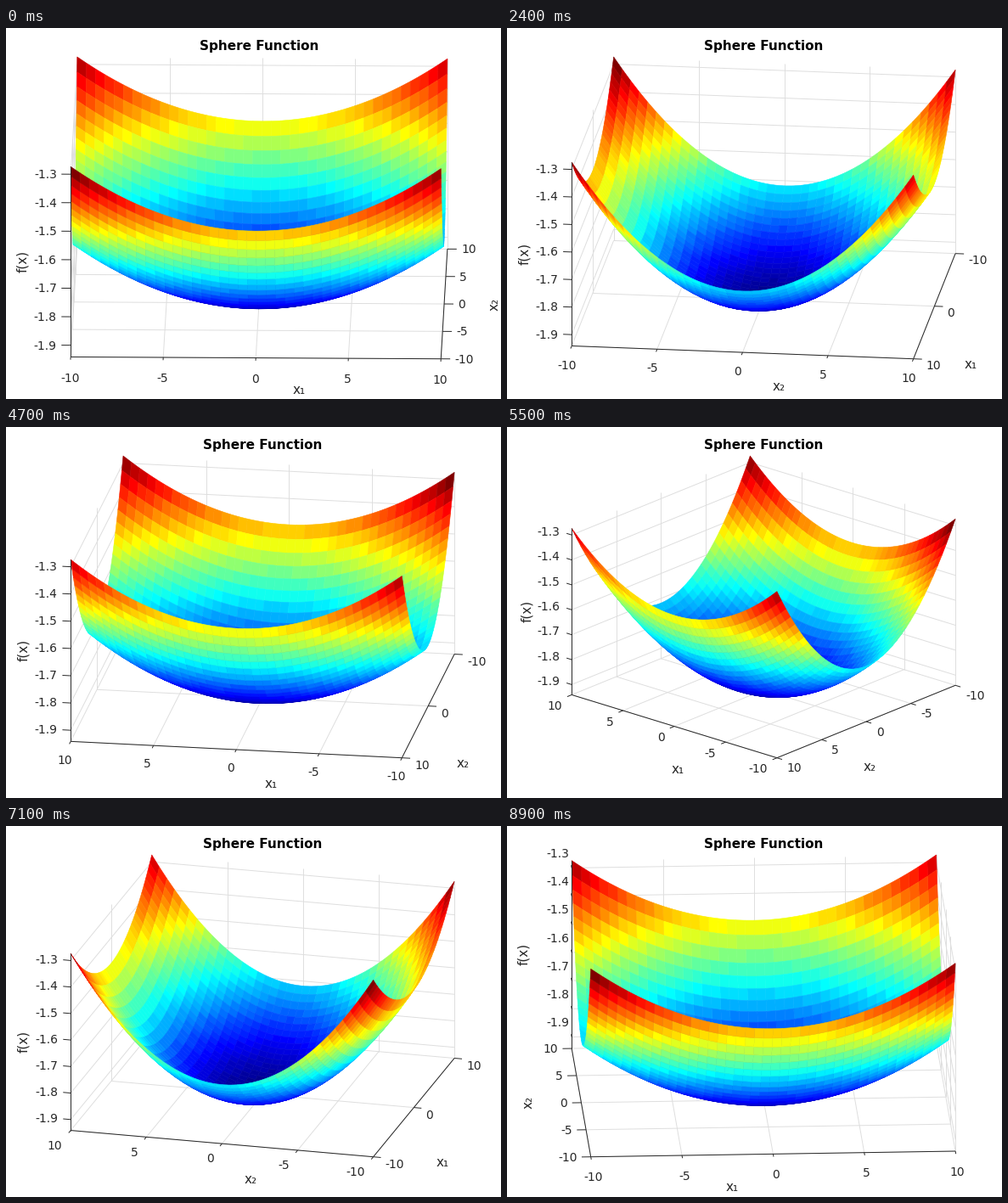
These frames come from a looping animation (583 px wide and 437 px high, 9 s). A matplotlib script:

```python
import numpy as np
import matplotlib.pyplot as plt
from matplotlib.animation import FuncAnimation
from matplotlib.collections import LineCollection, PolyCollection

W, H, DPI = 583, 437, 100
FRAMES = 90
LEFT, RIGHT, TOP, BOTTOM = 76.2, 528.1, 34.0, 389.7
INK, GRID = "#262626", "#dedede"
SIN_EL, COS_EL = 0.5, np.sqrt(3) / 2
TICK = 0.025

plt.rcParams["font.family"] = "DejaVu Sans"
fig = plt.figure(figsize=(W / DPI, H / DPI), dpi=DPI, facecolor="white")
ax = fig.add_axes([0, 0, 1, 1])


def sphere(x, y):
    return (2 * x**2 + 4 * y**2 - 1745) / 899


def jet(v):
    i = np.clip(np.floor(v * 64), 0, 63) + 1
    ramps = [((i - 24), (72 - i)), ((i - 8), (56 - i)), ((i + 8), (40 - i))]
    return np.stack([np.clip(np.minimum(a, b) / 16, 0, 1) for a, b in ramps], -1)


grid = np.linspace(-10, 10, 41)
GX, GY = np.meshgrid(grid, grid, indexing="ij")
GZ = sphere(GX, GY)
Z0, Z1 = GZ.min(), GZ.max()
COLORS = jet((GZ[:-1, :-1] - Z0) / (Z1 - Z0))
Z_TICKS = -np.arange(19, 12, -1) / 10


class View:
    """Orthographic view, stretched to fill the plot box."""

    def __init__(self, az):
        self.c, self.s = np.cos(np.radians(az)), np.sin(np.radians(az))
        self.delta = (az + 45) % 90 - 45
        self.turned = abs(self.delta) < 4
        self.side = 1 if self.delta > 0 else -1
        span = abs(self.c) + abs(self.s)
        self.right = RIGHT
        if self.turned and self.side > 0:
            short = min(abs(self.c), abs(self.s))
            self.right = min(RIGHT, 516 + 0.5 * (RIGHT - LEFT) * short / span)
        self.mid = (LEFT + self.right) / 2
        self.sx = (self.right - LEFT) / span
        self.sy = (BOTTOM - TOP) / (COS_EL + SIN_EL * span)
        self.front = (np.copysign(10, self.s), -np.copysign(10, self.c))

    def __call__(self, x, y, z=Z0):
        x, y = np.asarray(x) / 20, np.asarray(y) / 20
        z = (np.asarray(z) - Z0) / (Z1 - Z0) - 0.5
        px = self.mid + self.sx * (self.c * x + self.s * y)
        up = SIN_EL * (self.c * y - self.s * x) + COS_EL * z
        return np.stack(np.broadcast_arrays(px, (TOP + BOTTOM) / 2 - self.sy * up), -1)


def surface(view):
    pts = view(GX, GY, GZ)
    quads = np.stack([pts[:-1, :-1], pts[1:, :-1], pts[1:, 1:], pts[:-1, 1:]], 2)
    # far cells first
    step = tuple(slice(None, None, int(np.sign(f))) for f in view.front)
    ax.add_collection(PolyCollection(
        quads[step].reshape(-1, 4, 2), facecolors=COLORS[step].reshape(-1, 3),
        edgecolors="face", linewidths=0.4, zorder=2))


def lines(segs, color, z):
    ax.add_collection(LineCollection(segs, colors=color, linewidths=0.7, zorder=z))


def text(x, y, s, size=10, **kw):
    ax.text(x, y, s, **{"fontsize": size, "color": INK, "zorder": 4, **kw})


def unit(v):
    return v / np.hypot(*v)


def on_axis(view, axis, t):
    """Point at value t on the front floor edge that runs along the axis."""
    fx, fy = view.front
    return view(t, fy) if axis == 0 else view(fx, t)


def floor_axis(view, axis, main, ticks, segs):
    """One floor axis with ticks, numbers and name."""
    fx, fy = view.front
    ends = on_axis(view, axis, -10), on_axis(view, axis, 10)
    corner = view(fx, fy)
    out = corner - on_axis(view, 1 - axis, -view.front[1 - axis])
    d = unit(out)
    sgn = 1 if d[0] > 0 else -1
    segs.append(ends)
    for t in ticks:
        p = on_axis(view, axis, t)
        q = p + TICK * out
        segs.append((p, q))
        if main and abs(view.delta) < 12:
            dx, dy, ha = 12 * d[0], 7 + 14 * d[1]**2, "center"
        else:
            ha = "left" if sgn > 0 else "right"
            dx, dy = sgn * (5 + 3 * abs(d[1])), 7 + 9.5 * abs(d[1])
            if not main and view.turned:
                dx, dy = sgn * 5.5, 0
        text(q[0] + dx, q[1] + dy + 5, f"{t:g}", ha=ha)

    name = ("x₁", "x₂")[axis]
    mx, my = (ends[0] + ends[1]) / 2
    a = abs(view.delta)
    if not main and view.turned:
        text(mx + (59 if view.side > 0 else -62), my, name, 11,
             rotation=90, ha="center", va="center")
        return
    shift = view.side * 52 * (1 - a / 45)**1.1
    drop = 38.3 + 0.32 * a if main else 72 - 0.44 * a
    text(mx + shift, my + drop + 4, name, 11, ha="center")


def height_axis(view, segs):
    fx, fy = view.front
    left = min([(-fx, fy), (fx, -fy)], key=lambda p: view(*p)[0])
    out = view(*left) - view(fx, fy)
    d = unit(out)
    ends = view(*left, Z0), view(*left, Z1)
    segs.append(ends)
    for z in Z_TICKS:
        p = view(*left, z)
        q = p + TICK * out
        segs.append((p, q))
        a = q + d * (5.5 + 9 * abs(d[1]))
        text(a[0], a[1] + 5, f"{z:.1f}", ha="right")
    text(19.5 + 0.1 * abs(view.delta), (ends[0][1] + ends[1][1]) / 2, "f(x)", 11,
         rotation=90, ha="center", va="center")


def back_grid(view, xt, yt):
    bx, by = -view.front[0], -view.front[1]
    segs = []
    for t in xt:
        segs += [(view(t, -10), view(t, 10)), (view(t, by), view(t, by, Z1))]
    for t in yt:
        segs += [(view(-10, t), view(10, t)), (view(bx, t), view(bx, t, Z1))]
    for z in Z_TICKS:
        segs += [(view(bx, -10, z), view(bx, 10, z)),
                 (view(-10, by, z), view(10, by, z))]
    lines(segs, GRID, 1)


def draw(k):
    ax.clear()
    ax.set_xlim(0, W)
    ax.set_ylim(H, 0)
    ax.axis("off")
    view = View(1 + 4 * k)
    main = 0 if abs(view.c) > abs(view.s) else 1

    ticks = [None, None]
    for axis in (0, 1):
        size = np.hypot(*(on_axis(view, axis, 10) - on_axis(view, axis, -10)))
        sparse = axis != main and not view.turned and size < 172
        ticks[axis] = range(-10, 11, 10 if sparse else 5)

    back_grid(view, *ticks)
    surface(view)
    segs = []
    for axis in (0, 1):
        floor_axis(view, axis, axis == main, ticks[axis], segs)
    height_axis(view, segs)
    lines(segs, INK, 3)
    text(view.mid, 26, "Sphere Function", 11, ha="center", weight="bold", color="black")
    return []


anim = FuncAnimation(fig, draw, frames=FRAMES, interval=100,
                     init_func=lambda: [], repeat=True)
plt.show()
```
